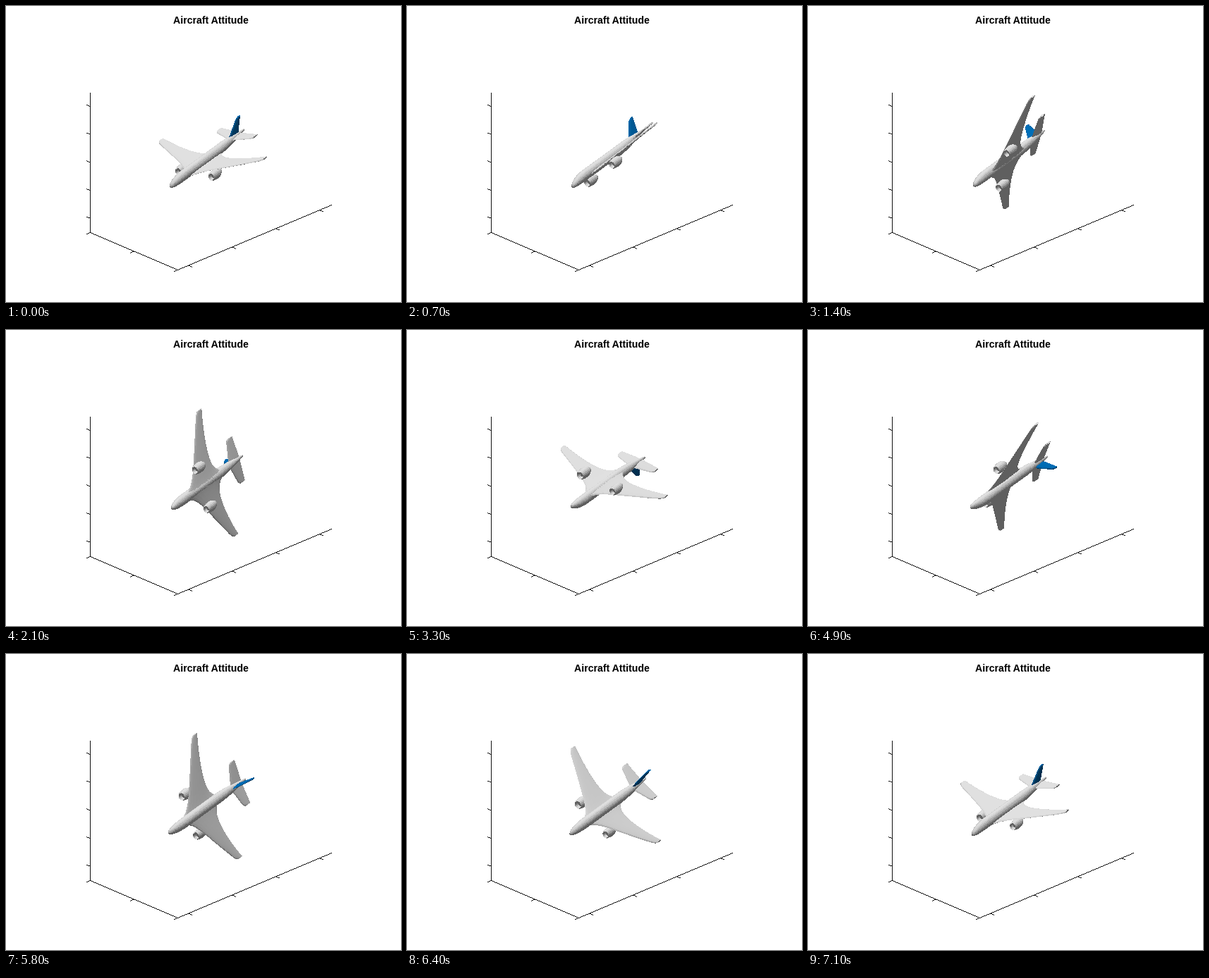
Animation of 560 by 420 pixels, one loop 7.3 s. Source, as a matplotlib script:

```python
import numpy as np
import matplotlib.pyplot as plt
from matplotlib.animation import FuncAnimation

W, H, DPI = 560, 420, 100
FRAMES, STEP = 73, 5

GREY = (0.89, 0.89, 0.89)
BLUE = (0.0, 0.447, 0.741)
INK = 0.07

# Screen projection of the rolled axes: x aft, y sideways, z up.
NOSE = np.array([232.5, 253.0])
VIEW = np.array([[0.545, 0.75, -0.073],
                 [-0.395, 0.13, -0.90]])
LENS = 0.001
TO_EYE = np.cross(VIEW[0], VIEW[1])
LIGHT = np.array([0.0, 0.087, 0.996])


def loft(rings, color):
    """Closed surface through rings of points: quads, normals, colours."""
    rings = np.asarray(rings, float)
    first, last = (np.repeat(r.mean(axis=0)[None], len(r), axis=0)
                   for r in (rings[0], rings[-1]))
    rings = np.concatenate([[first], rings, [last]])
    after = np.roll(rings, -1, axis=1)
    quads = np.stack([rings[:-1], after[:-1], after[1:], rings[1:]], axis=2)
    quads = quads.reshape(-1, 4, 3)
    normals = np.cross(quads[:, 2] - quads[:, 0], quads[:, 3] - quads[:, 1])
    mids = quads.mean(axis=1)
    if np.sum(normals * (mids - mids.mean(axis=0))) < 0:
        normals = -normals
    size = np.linalg.norm(normals, axis=1, keepdims=True)
    return quads, normals / np.maximum(size, 1e-9), np.tile(color, (len(quads), 1))


def tube(xs, radii, heights, side=0.0, sides=24):
    a = np.linspace(0, 2 * np.pi, sides, endpoint=False)
    return loft([np.column_stack([np.full(sides, x), side + r * np.cos(a), z + r * np.sin(a)])
                 for x, r, z in zip(xs, radii, heights)], GREY)


def blade(spans, lead, trail, thick, place, color, n=11):
    """Wing-like panel; place maps chord, span and offset to x, y, z."""
    c = (1 - np.cos(np.linspace(0, np.pi, n))) / 2
    c = np.concatenate([c, c[-2:0:-1]])
    side = np.where(np.arange(len(c)) < n, 1, -1)
    rings = []
    for s in spans:
        x0, x1 = lead(s) + 3 * (s / spans[-1]) ** 40, trail(s)
        off = side * thick * (0.7 + 0.025 * (x1 - x0)) * np.sqrt(4 * c * (1 - c))
        rings.append(np.column_stack(place(x0 + c * (x1 - x0), np.full(len(c), s), off)))
    return loft(rings, color)


def fuselage():
    x = 191 * (1 - np.cos(np.linspace(0.05, np.pi, 50))) / 2
    front = np.clip(1 - x / 36, 0, 1)
    rear = np.clip((x - 125) / 66, 0, 1)
    radius = 7.2 * np.sqrt(1 - front ** 2) * (1 - 0.9 * rear ** 1.6)
    return tube(x, radius, 3 * rear - 3.3 * front ** 2)


def engine(side):
    u = np.linspace(0, 1, 12)
    outer = 5.4 * (1 - u ** 4) + 1.7 * np.sin(np.pi * u) + 0.3
    x = np.concatenate([[70, 70], 64 + 25 * u])
    radius = np.concatenate([[0.3, 4.7], outer])
    return tube(x, radius, np.full(len(x), -12.0), side=31 * side, sides=20)


def wing(side):
    return blade(np.linspace(2, 98, 50),
                 lambda s: 50.7 + 0.667 * s - 26 * np.exp(-s / 7),
                 lambda s: 108 + 0.0022 * s ** 2 + 30 * np.exp(-s / 10), 0.7,
                 lambda x, s, off: (x, side * s, off - 4.5 * (1 - s / 98)), GREY)


def tailplane(side):
    return blade(np.linspace(1, 34, 18), lambda s: 155 + 0.37 * s, lambda s: 181.5, 0.7,
                 lambda x, s, off: (x, side * s, off + 2 + s / 17), GREY)


def fin():
    return blade(np.linspace(3, 28, 16), lambda s: 148 + s, lambda s: 175 + 0.33 * s, 0.8,
                 lambda x, s, off: (x, off, s), BLUE)


parts = [fuselage(), fin()]
for sign in (-1, 1):
    parts += [wing(sign), tailplane(sign), engine(sign)]
quads, normals, colors = (np.concatenate(group) for group in zip(*parts))

# Bilinear weights that fill a quad with sample points.
t = (np.arange(8) + 0.5) / 8
u, v = (g.ravel() for g in np.meshgrid(t, t))
FILL = np.column_stack([(1 - u) * (1 - v), u * (1 - v), u * v, (1 - u) * v])


def roll(points, angle):
    c, s = np.cos(angle), np.sin(angle)
    return points @ np.array([[1, 0, 0], [0, c, -s], [0, s, c]]).T


def project(points):
    off_axis = points[:, 1:] @ VIEW[:, 1:].T
    return NOSE + points[:, :1] * VIEW[:, 0] + off_axis * (1 - LENS * points[:, 1:2])


def line(canvas, start, end):
    start, end = np.array(start), np.array(end)
    count = int(np.ceil(np.abs(end - start).max())) + 1
    x, y = np.rint(np.linspace(start, end, count)).astype(int).T
    canvas[y, x] = INK


def axes_box():
    canvas = np.ones((H, W, 3))
    left, front, right = np.array([[119, 321], [243, 374], [461, 282]])
    for start, end in (((119, 123), left), (left, front), (front, right)):
        line(canvas, start, end)
    for k in range(5):
        p = np.array([119, 142 + 39.7 * k])
        line(canvas, p, p + (-5, -2))
    for k in range(3):
        p = left + (front - left) * k / 2
        line(canvas, p, p + (-5, 2))
    for k in range(4):
        p = front + (right - front) * (15 + 62 * k) / 218
        line(canvas, p, p + (5, 2))
    return canvas


fig = plt.figure(figsize=(W / DPI, H / DPI), dpi=DPI, facecolor="white")
ax = fig.add_axes([0, 0, 1, 1])
ax.axis("off")
backdrop = axes_box()
picture = ax.imshow(backdrop, interpolation="nearest", aspect="auto", vmin=0, vmax=1)
ax.text(290, 25, "Aircraft Attitude", family="Liberation Sans", weight="bold",
        size=14.1 * 72 / DPI, color="black", ha="center", va="baseline")


def draw(i):
    angle = np.radians(STEP * min(i, FRAMES - 2))
    n = roll(normals, angle)
    seen = n @ TO_EYE > 0
    shade = 0.42 + 0.57 * np.clip(n[seen] @ LIGHT, 0, 1)
    tint = np.repeat(colors[seen] * shade[:, None], len(FILL), axis=0)
    points = (FILL @ roll(quads[seen], angle)).reshape(-1, 3)
    order = np.argsort(points @ TO_EYE)  # nearest painted last
    x, y = np.rint(project(points[order])).astype(int).T
    canvas = backdrop.copy()
    canvas[y, x] = tint[order]
    picture.set_data(canvas)
    return (picture,)


anim = FuncAnimation(fig, draw, frames=FRAMES, init_func=lambda: draw(0),
                     interval=100, repeat=True, repeat_delay=0)
plt.show()
```
